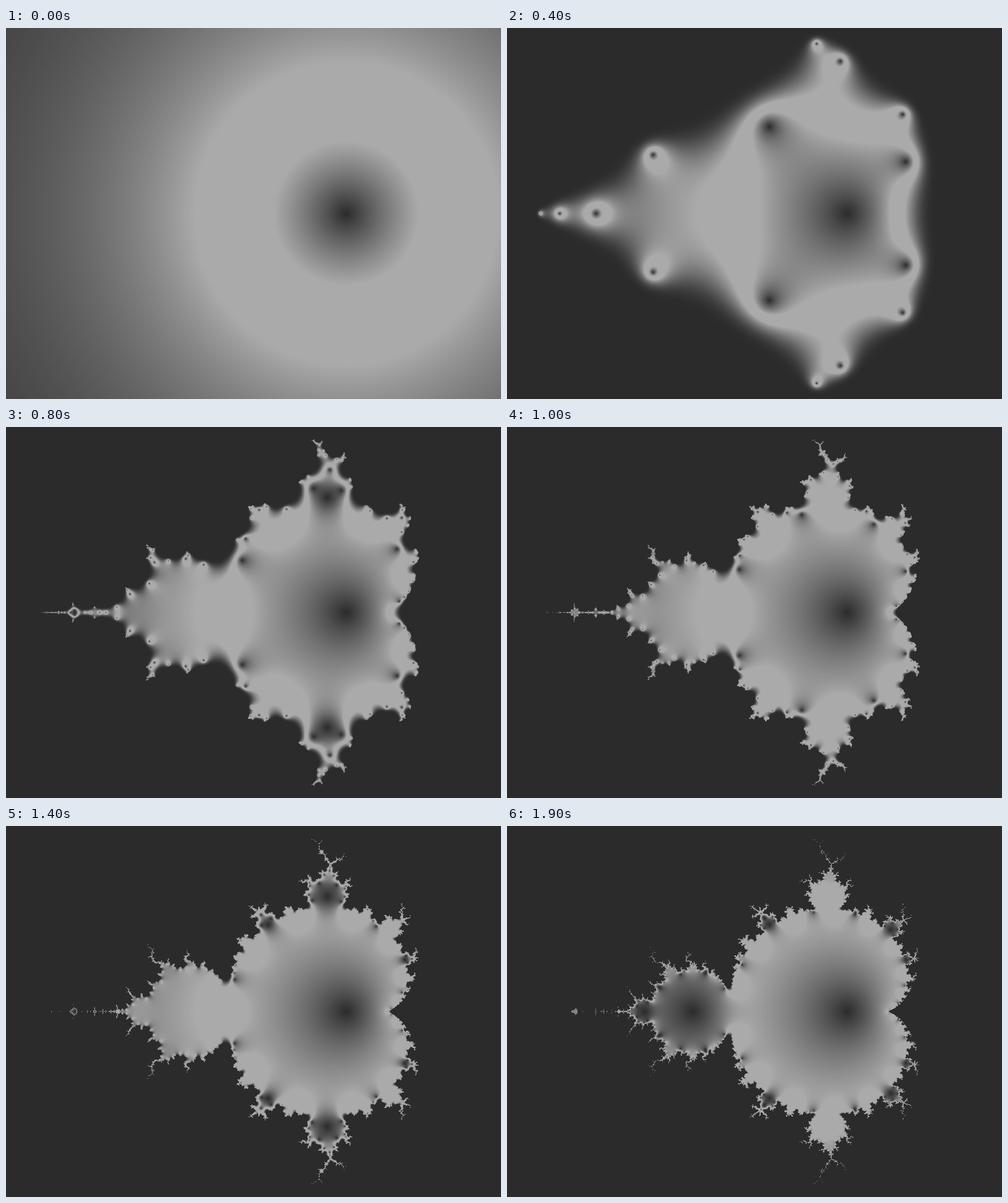
An HTML page with a canvas for the animation above (2 s loop, 800 by 600 pixels).

```html
<!DOCTYPE html>
<html lang="en">
<head>
<meta charset="utf-8">
<title>Mandelbrot iterations</title>
<style>
  html, body { margin: 0; width: 100%; height: 100%; overflow: hidden; background: #2a2a2a; }
  canvas { display: block; }
</style>
</head>
<body>
<canvas id="stage" width="800" height="600"></canvas>
<script>
const WIDTH = 800, HEIGHT = 600, STEPS = 20, STEP_MS = 100;
const ctx = document.getElementById('stage').getContext('2d');

// Rainbow ramp reduced to grey: rises to a plateau, then falls symmetrically.
const DARK = 255 / 6, LIGHT = 170;
const ramp = Array.from({ length: 256 }, (_, level) => {
  const edge = Math.min(level, 255 - level) / 255;
  const grey = Math.round(DARK + (LIGHT - DARK) * Math.min(1, edge / 0.375));
  return (0xff000000 | grey * 0x010101) >>> 0;
});

const frames = Array.from({ length: STEPS }, () => ctx.createImageData(WIDTH, HEIGHT));
const pixels = frames.map(frame => new Uint32Array(frame.data.buffer));

// Shade every pixel by exp(-|z|) after each step of z = z² + c.
for (let row = 0; row < HEIGHT / 2; row++) {
  const ci = -1.2 + 2.4 * row / (HEIGHT - 1);
  for (let col = 0; col < WIDTH; col++) {
    const cr = -2.2 + 3.2 * col / (WIDTH - 1);
    const upper = row * WIDTH + col;
    const lower = (HEIGHT - 1 - row) * WIDTH + col;
    let re = 0, im = 0, escaped = false;
    for (let step = 0; step < STEPS; step++) {
      let level = 0;
      if (!escaped) {
        const next = re * re - im * im + cr;
        im = 2 * re * im + ci;
        re = next;
        const size = Math.sqrt(re * re + im * im);
        escaped = size > 50;
        level = Math.round(255 * Math.exp(-size));
      }
      pixels[step][upper] = pixels[step][lower] = ramp[level];
    }
  }
}

let shown = -1;
function draw() {
  const step = Math.floor(performance.now() / STEP_MS) % STEPS;
  if (step !== shown) {
    ctx.putImageData(frames[step], 0, 0);
    shown = step;
  }
  requestAnimationFrame(draw);
}
draw();
</script>
</body>
</html>
```
